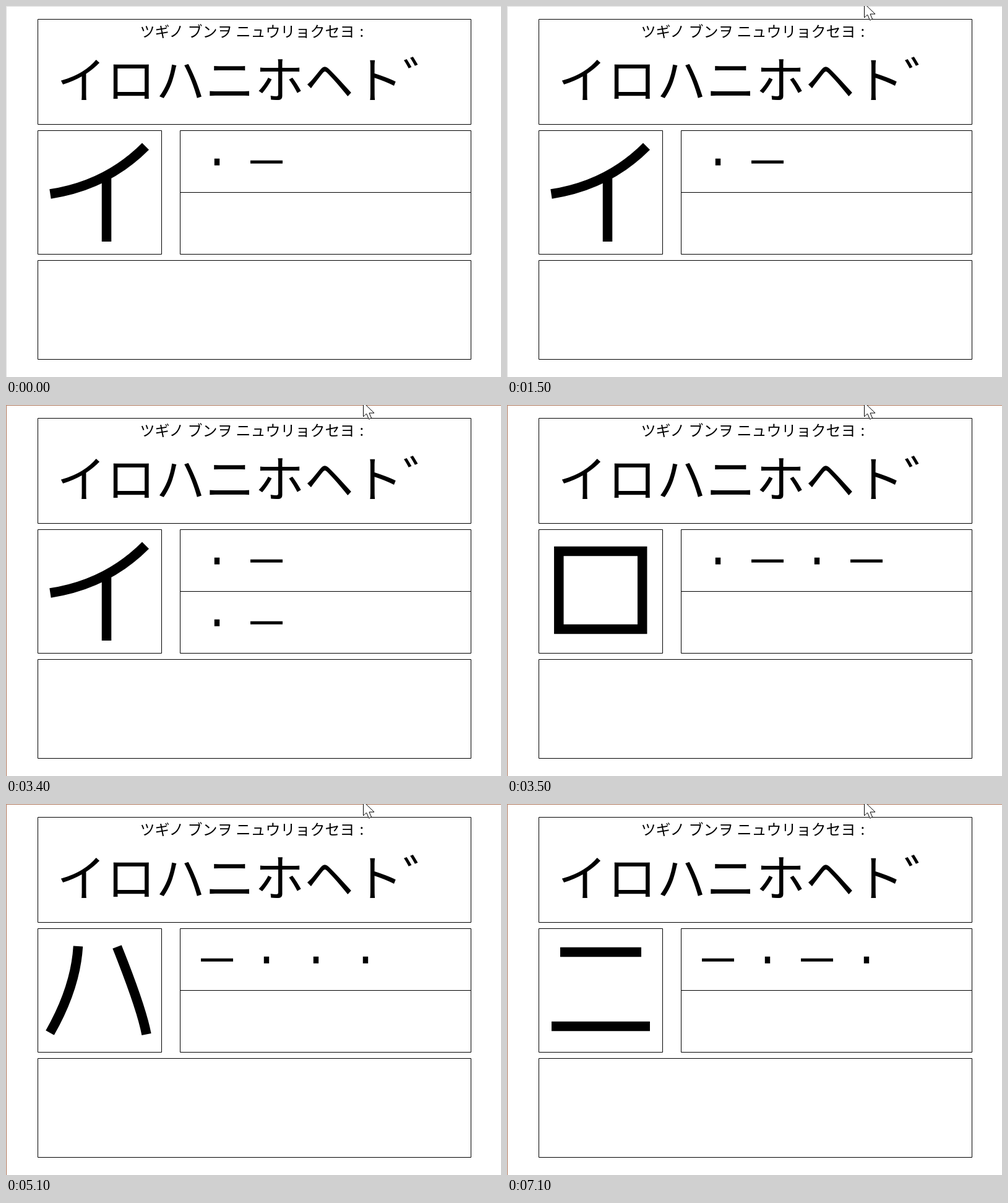
Write an HTML page that moves like this. It is 800 px wide and 600 px high and loops after 7200 ms.

```html
<!DOCTYPE html>
<html lang="ja">
<head>
<meta charset="utf-8">
<title>モールス練習</title>
<style>
  html, body { margin: 0; width: 100%; height: 100%; overflow: hidden; background: #fff; }
  svg { display: block; }
  text { font-family: "Noto Sans CJK JP", "Noto Sans CJK", sans-serif; white-space: pre; }
  .line { fill: none; stroke: #000; }
</style>
</head>
<body>
<svg width="800" height="600" viewBox="0 0 800 600">
  <path id="edge" fill="none" d="M.5 600V.5H800"/>
  <path class="line" d="M51.5 21.5h700v170h-700zM51.5 201.5h200v200h-200zM281.5 201.5h470v200h-470zM281.5 301.5h470M51.5 411.5h700v160h-700z"/>
  <text x="216.5" y="50" font-size="24" word-spacing=".6">ツギノ ブンヲ ニュウリョクセヨ <tspan dx="2">:</tspan></text>
  <text x="82" y="149" font-size="80">イロハニホヘト゛</text>
  <path id="letter" class="line" stroke-width="15.5"/>
  <path id="model"/>
  <path id="typed"/>
  <path id="cursor" d="M0 0V23L5 18L9 27L13 25L9.5 17H17.5Z" fill="#fff" stroke="#000"/>
</svg>
<script>
const LOOP = 7200;
const el = id => document.getElementById(id);

const letters = {
  イ: { code: '.-', shape: 'M71.5 304Q163 290 225.5 227M162.5 277V381' },
  ロ: { code: '.-.-', shape: 'M83.8 236.5H218.7V362.5H83.8Z' },
  ハ: { code: '-...', shape: 'M116.5 230Q112.5 297 71 370M179.5 231Q219 330 227 372.5' },
  ニ: { code: '-.-.', shape: 'M86 239.5H217M72 359.5H231' }
};

// Time, letter to send, signals entered so far
const steps = [
  [0, 'イ', ''], [2900, 'イ', '.'], [3400, 'イ', '.-'],
  [3500, 'ロ', ''], [4000, 'ロ', '.'], [4500, 'ロ', '.-'], [4700, 'ロ', '.-.'], [5000, 'ロ', '.-.-'],
  [5100, 'ハ', ''], [5800, 'ハ', '-'], [6000, 'ハ', '-.'], [6200, 'ハ', '-..'],
  [6400, 'ニ', ''], [6600, 'ニ', '.'], [6700, 'ニ', ''], [7000, 'ニ', '.'], [7100, 'ニ', '']
];

// Pointer tip every 100 ms, starting at 700 ms
const pointer = [
  [525.5, 71.5], [521.5, 98], [520.5, 108.5], [523.5, 102], [532.5, 78],
  [546.5, 45], [561.5, 15], [572.5, -4], [577.5, -4]
];

const morse = (code, y) => [...code].map((signal, i) => {
  const x = 341 + 80 * i;
  return signal === '-'
    ? `M${x - 26} ${y - 2.5}h52v5h-52z`
    : `M${x - 4.2} ${y - 5.5}h8.4v11h-8.4z`;
}).join('');

function draw(t) {
  const [, name, entered] = steps.findLast(([start]) => start <= t);
  const { code, shape } = letters[name];
  el('letter').setAttribute('d', shape);
  el('model').setAttribute('d', morse(code, 252.2));
  el('typed').setAttribute('d', morse(entered, 352.2));
  el('edge').setAttribute('stroke', t < 1800 ? '#ddd' : '#ad7458');

  const index = Math.floor((t - 700) / 100);
  const [x, y] = pointer[Math.max(0, Math.min(index, pointer.length - 1))];
  el('cursor').setAttribute('transform', `translate(${x} ${y})`);
  el('cursor').setAttribute('visibility', index < 0 ? 'hidden' : 'visible');
}

const begin = performance.now();
function frame() {
  draw((performance.now() - begin) % LOOP);
  requestAnimationFrame(frame);
}
frame();
</script>
</body>
</html>
```
